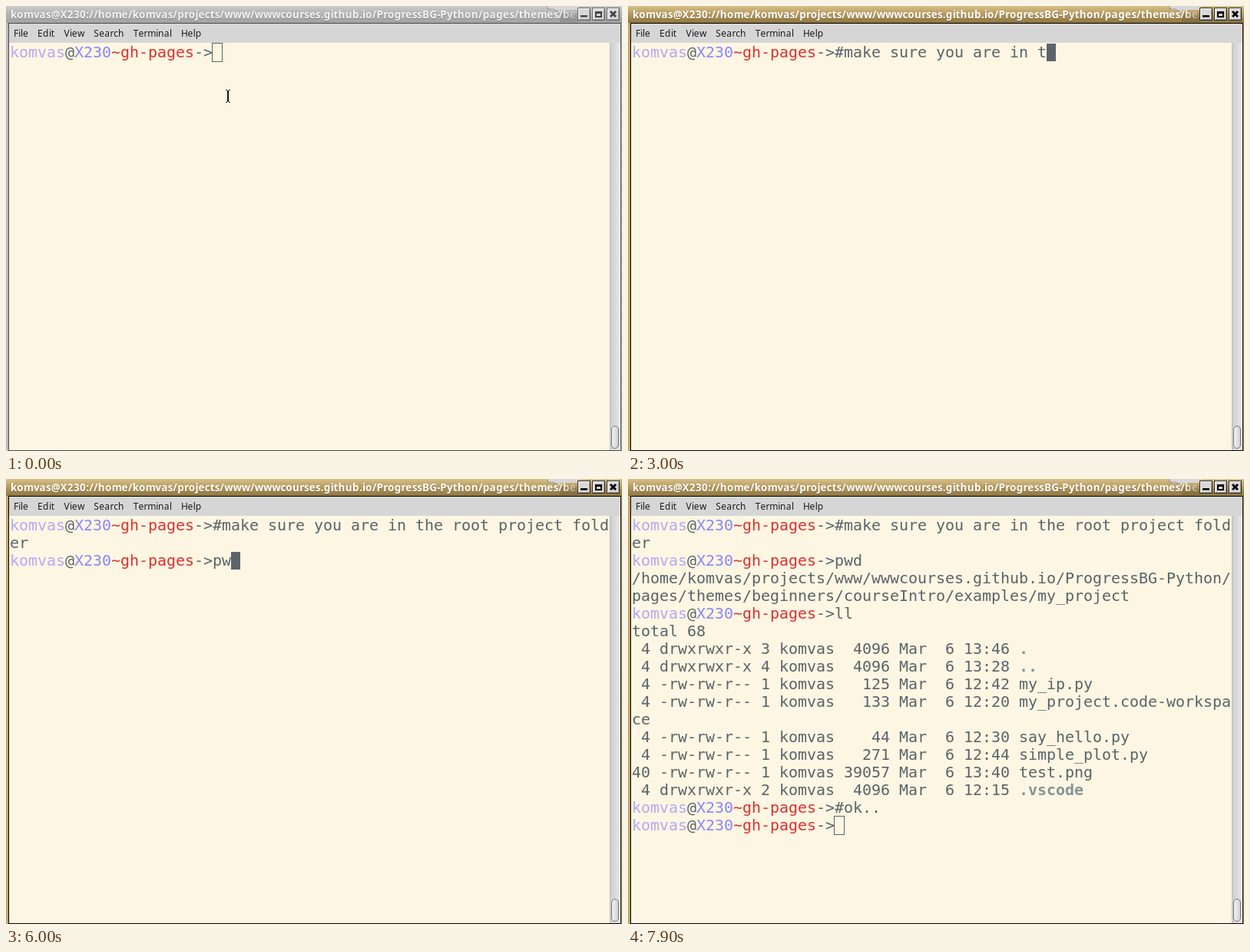
Animation, 802 px wide and 580 px high, one loop 8 s. Source, as an HTML page:

```html
<!DOCTYPE html>
<html lang="en">
<head>
<meta charset="utf-8">
<title>Terminal session</title>
<style>
html, body { margin: 0; width: 100%; height: 100%; overflow: hidden; }
#stage { position: relative; width: 802px; height: 580px; overflow: hidden; background: #fdf6e3;
  --frame: linear-gradient(#d6bf88, #b99d60 45%, #8f7540); --edge: #c3a76a; --line: #000; --ink: #000; --title: #fff; }
#stage.idle { --frame: linear-gradient(#cbcbcb, #b4b4b4 45%, #a2a2a2); --edge: #bcbcbc; --line: #4a4a4a; --ink: #444; --title: #f3f3f3; }
#stage div, svg { position: absolute; }
#bar { left: 0; top: 0; width: 802px; height: 22px; background: var(--frame); }
#title { left: 6px; top: 0; width: 738px; height: 22px; overflow: hidden; white-space: pre;
  font: bold 13.4px/22px "Noto Sans", "Open Sans", sans-serif; color: var(--title); text-shadow: 0 1px 1px #0004;
  -webkit-mask-image: linear-gradient(90deg, #000 715px, #0003 739px); mask-image: linear-gradient(90deg, #000 715px, #0003 739px); }
#left { left: 0; top: 22px; width: 3px; height: 558px; background: var(--edge); }
#right { left: 801px; top: 22px; width: 1px; height: 558px; background: var(--edge); }
#box { left: 3px; top: 22px; width: 796px; height: 556px; border: 1px solid var(--line); }
#menu { left: 4px; top: 23px; width: 790px; height: 25px; padding-left: 6px; display: flex; gap: 12px; background: #d6d6d6; }
.item { font: 12px/25px "Noto Sans", "Open Sans", sans-serif; color: #1c1c1c; }
#title, .item { font-kerning: none; }
#track { left: 786px; top: 48px; width: 14px; height: 531px; background: linear-gradient(90deg, #bdbdbd 1px, #cecece 1px, #e9e9e9); }
#thumb { left: 2px; top: 499px; width: 8px; height: 28px; border: 1px solid #777; border-radius: 5px;
  background: linear-gradient(90deg, #f4f4f4, #cfcfcf); }
.row { left: 5px; height: 24px; white-space: pre; color: #5a6469;
  font: 20px/24px "DejaVu Sans Mono", monospace; letter-spacing: calc(12px - 1ch); }
.user { color: #b5a8f8; }
.host { color: #8a87fa; }
.dir { color: #dc322f; }
.fold { color: #839496; font-weight: bold; }
#cursor { box-sizing: border-box; }
#cursor.on { width: 12px; height: 23px; background: #5b646a; }
#cursor.box { width: 14px; height: 25px; margin: -1px; border: 1px solid #5b646a; }
#cursor.off { display: none; }
</style>
</head>
<body>
<div id="stage">
  <div id="bar"></div>
  <svg width="802" height="22" viewBox="0 0 802 22">
    <path d="M704 0h42v5h-24l-2 4-4-4h-8z" fill="#d9d6d8"/>
    <path d="M705 0v4h8l5 4v-3" fill="none" stroke="#777" stroke-opacity=".6"/>
    <path d="M721 9h24v12h-24z" fill="#000" fill-opacity=".12"/>
    <g id="buttons"></g>
  </svg>
  <div id="title"></div>
  <div id="left"></div>
  <div id="right"></div>
  <div id="menu"></div>
  <div id="track"><div id="thumb"></div></div>
  <div id="box"></div>
  <div id="screen"></div>
  <div id="cursor"></div>
  <svg id="mouse" style="left:284px;top:108px" width="10" height="20" viewBox="0 0 10 20">
    <g fill="none">
      <path d="M1.5 1.5h7M1.5 17.5h7M5 2v15" stroke="#fff" stroke-width="3"/>
      <path d="M2 1.5h2M6 1.5h2M2 17.5h2M6 17.5h2" stroke="#111"/>
      <path d="M5 2v15" stroke="#111" stroke-width="2"/>
    </g>
  </svg>
</div>
<script>
const $ = id => document.getElementById(id);
const USER = 'komvas', COLS = 65, CELL = 12, ROW = 23, LEFT = 5, TOP = 49, STEP = 100;
const ROOT = `/home/${USER}/projects/www/wwwcourses.github.io/ProgressBG-Python/pages/themes/beginners/courseIntro/examples/my_project`;

// Sets text with every advance rounded to whole pixels, as hinted desktop text is.
const pen = document.createElement('canvas').getContext('2d');
function setSnapped(el, text) {
  pen.font = getComputedStyle(el).font;
  for (const ch of text) {
    const span = document.createElement('span');
    const width = pen.measureText(ch).width;
    span.textContent = ch;
    span.style.letterSpacing = Math.round(width) - width + 'px';
    el.append(span);
  }
}
setSnapped($('title'), `${USER}@X230:/${ROOT}`);
for (const name of ['File', 'Edit', 'View', 'Search', 'Terminal', 'Help']) {
  const item = document.createElement('span');
  item.className = 'item';
  $('menu').append(item);
  setSnapped(item, name);
}

const glyphs = [
  'M4 10h9v2.5h-9z',
  'M4 5h9v8h-9zM6 8h5v3h-5z',
  'M4 6l2-2 2.5 2.5 2.5-2.5 2 2-2.5 2.5 2.5 2.5-2 2-2.5-2.5-2.5 2.5-2-2 2.5-2.5z'
];
$('buttons').innerHTML = glyphs.map((d, i) => `<g transform="translate(${744 + i * 19} 2)">
  <rect x=".5" y=".5" width="16" height="16" fill="#d8d8d8" style="stroke:var(--line)" stroke-opacity=".75"/>
  <path d="M1.5 15.5v-14h14" fill="none" stroke="#f6f6f6"/>
  <path d="M2 15.5h13.5v-13" fill="none" stroke="#999"/>
  <path d="${d}" style="fill:var(--ink)" fill-rule="evenodd"/></g>`).join('');

// Screen content is a list of lines; a line is a list of [text, class] parts.
const prompt = text => [[USER, 'user'], ['@', ''], ['X230', 'host'], ['~gh-pages', 'dir'], ['->' + text, '']];
const entry = (blocks, mode, links, size, time, name) => [
  [`${blocks.toString().padStart(2)} ${mode} ${links} ${USER} ${size.toString().padStart(5)} Mar  6 ${time} `, ''],
  [name, mode[0] === 'd' ? 'fold' : '']
];
const FILE = '-rw-rw-r--', DIR = 'drwxrwxr-x';
const listing = [
  [['total 68', '']],
  entry(4, DIR, 3, 4096, '13:46', '.'),
  entry(4, DIR, 4, 4096, '13:28', '..'),
  entry(4, FILE, 1, 125, '12:42', 'my_ip.py'),
  entry(4, FILE, 1, 133, '12:20', 'my_project.code-workspace'),
  entry(4, FILE, 1, 44, '12:30', 'say_hello.py'),
  entry(4, FILE, 1, 271, '12:44', 'simple_plot.py'),
  entry(40, FILE, 1, 39057, '13:40', 'test.png'),
  entry(4, DIR, 2, 4096, '12:15', '.vscode')
];
const commands = [
  { text: '#make sure you are in the root project folder', output: [] },
  { text: 'pwd', output: [[[ROOT, '']]] },
  { text: 'll', output: listing },
  { text: '#ok..', output: [] },
  { text: '', output: [] }
];

const steps = [];
const show = (cmd, input, cursor = 'on') => steps.push({ cmd, input, cursor });
const type = (cmd, from, to = from, cursor) => {
  for (let n = from; n <= to; n++) show(cmd, commands[cmd].text.slice(0, n), cursor);
};
show(0, '', 'box');
type(0, 0); type(0, 0, 0, 'off'); type(0, 0, 14);
type(0, 15, 15, 'off'); type(0, 15, 21);
show(0, '#make sure you are int'); show(0, '#make sure you are int ');
type(0, 21, 31); type(0, 31, 31, 'off');
type(0, 31, 35); type(0, 35, 35, 'off');
type(0, 35, 38); type(0, 39, 39, 'off');
for (const n of [39, 41, 43, 44, 45]) type(0, n);
type(1, 0); type(1, 0, 0, 'off'); type(1, 0, 3); type(1, 3, 3, 'off');
type(2, 0); type(2, 0, 0, 'off'); type(2, 0); type(2, 0, 0, 'off'); type(2, 1, 2); type(2, 2, 2, 'off');
type(3, 0); type(3, 0, 0, 'off'); type(3, 0, 5);
type(4, 0); type(4, 0, 0, 'box');

// Breaks one line into rows of COLS cells, keeping the colours.
function wrap(line) {
  const rows = [''];
  let col = 0;
  for (let [text, cls] of line) {
    while (text) {
      const part = text.slice(0, COLS - col);
      rows[rows.length - 1] += `<span class="${cls}">${part.replace('>', '&gt;')}</span>`;
      text = text.slice(part.length);
      col += part.length;
      if (col === COLS) { rows.push(''); col = 0; }
    }
  }
  return { rows, col };
}

function draw(index) {
  const { cmd, input, cursor } = steps[index];
  const lines = commands.slice(0, cmd).flatMap(c => [prompt(c.text), ...c.output]);
  const last = wrap(prompt(input));
  const rows = [...lines.flatMap(line => wrap(line).rows), ...last.rows];
  $('screen').innerHTML = rows
    .map((html, i) => `<div class="row" style="top:${TOP - 1 + i * ROW}px">${html}</div>`).join('');
  const c = $('cursor');
  c.className = cursor;
  c.style.left = LEFT + last.col * CELL + 'px';
  c.style.top = TOP + (rows.length - 1) * ROW + 'px';
  $('stage').classList.toggle('idle', index === 0);
  $('mouse').style.display = cmd === 0 && !input ? '' : 'none';
}

const start = performance.now();
let shown = -1;
function tick() {
  const index = Math.floor((performance.now() - start) / STEP) % steps.length;
  if (index !== shown) draw(shown = index);
  requestAnimationFrame(tick);
}
tick();
</script>
</body>
</html>
```
